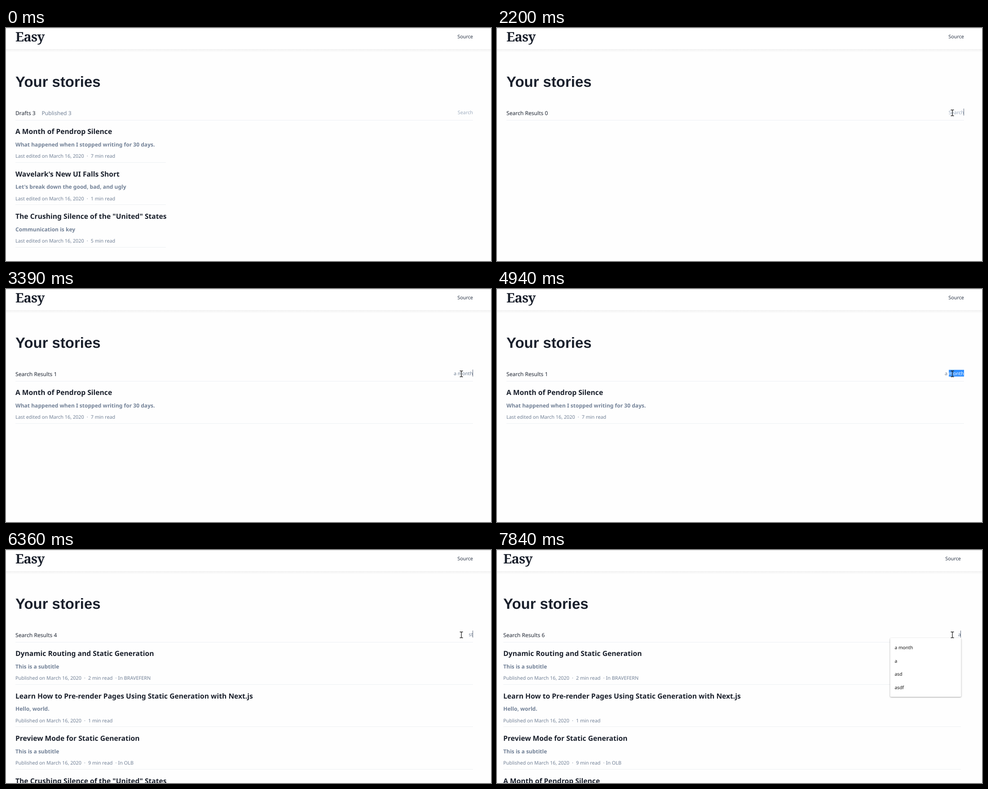
Write an HTML page that moves like this. It is 1080x519 px and loops after 8 s.

```html
<!DOCTYPE html>
<html lang="en">
<head>
<meta charset="utf-8">
<title>Your stories</title>
<style>
  html, body { margin: 0; width: 100%; height: 100%; overflow: hidden; background: #fefefe; }
  svg { display: block; width: 100%; height: 100%; }
  text {
    font-family: "Noto Sans", "Open Sans", sans-serif;
    font-size: 10.85px; fill: #718096;
    white-space: pre; text-rendering: geometricPrecision;
  }
  .logo { font: 700 29.2px "Noto Serif", serif; letter-spacing: -.73px; fill: #1a202c; }
  .head { font: 700 32.9px "Liberation Sans", Arial, sans-serif; fill: #1a202c; }
  .nav { fill: #2d3748; text-anchor: end; }
  .tab { font-size: 12.1px; }
  .on { fill: #1f2633; }
  .title { font-size: 15.65px; font-weight: 700; fill: #1a202c; }
  .sub { font-size: 12.05px; font-weight: 600; }
  .input { font-size: 10.8px; text-anchor: end; }
  .hint { fill: #a0aec0; }
  .option { font-size: 10.3px; font-weight: 500; fill: #111; }
  .menu { fill: #fff; filter: drop-shadow(0 1px 1.5px rgba(0, 0, 0, .38)); }
  .rule { stroke: #edf0f3; }
  .caret { stroke: #5a6678; }
  .picked { fill: #3390ff; }
</style>
</head>
<body>
<svg viewBox="0 0 1080 519" xmlns="http://www.w3.org/2000/svg">
  <defs>
    <linearGradient id="shade" x2="0" y2="1">
      <stop offset="0" stop-color="#f1f1f1"/>
      <stop offset="1" stop-color="#fefefe"/>
    </linearGradient>
  </defs>
  <rect width="1080" height="47" fill="#fff"/>
  <rect y="47" width="1080" height="7" fill="url(#shade)"/>
  <rect width="1080" height="1" fill="#dadada"/>
  <g id="page"></g>
  <path id="arrow" d="M.5 .5V13L3.4 10.3L5.3 14.8L7.4 13.9L5.5 9.5H9.6Z" fill="#fff" stroke="#555" stroke-width=".9"/>
  <path id="beam" d="M-3.5 -6.5H-1L0 -5.5L1 -6.5H3.5M0 -5.5V5.5M-3.5 6.5H-1L0 5.5L1 6.5H3.5" fill="none" stroke="#222" stroke-width="1.3"/>
</svg>
<script>
const LOOP = 8000, RIGHT = 1040, ROW = 94.6;
const byId = id => document.getElementById(id);
const page = byId("page");

const story = (title, sub, mins, where) => ({ title, sub, mins, where });
const month = story("A Month of Pendrop Silence", "What happened when I stopped writing for 30 days.", 7);
const newUi = story("Wavelark's New UI Falls Short", "Let's break down the good, bad, and ugly", 1);
const crushing = story('The Crushing Silence of the "United" States', "Communication is key", 5);
const routing = story("Dynamic Routing and Static Generation", "This is a subtitle", 2, "BRAVEFERN");
const learn = story("Learn How to Pre-render Pages Using Static Generation with Next.js", "Hello, world.", 1);
const preview = story("Preview Mode for Static Generation", "This is a subtitle", 9, "OLB");

const drafts = [month, newUi, crushing];
const published = [routing, learn, preview];
const all = [...published, ...drafts];
const statics = [...published, crushing];
const recent = ["a month", "a", "asd", "asdf"];

// Each step: start time and what changes from the step before.
const steps = [
  [0, { search: false, rows: drafts, query: "", caret: false, menu: [], picked: "" }],
  [2130, { caret: true }],
  [2200, { search: true, rows: [] }],
  [2750, { query: "a", rows: all, menu: recent }],
  [2830, { query: "a ", rows: [month], menu: recent.slice(0, 1) }],
  [2910, { query: "a m" }],
  [3070, { query: "a mo" }],
  [3150, { query: "a mon" }],
  [3310, { query: "a mont" }],
  [3390, { query: "a month", menu: [] }],
  [3930, { caret: false }],
  [4470, { caret: true }],
  [4940, { caret: false, picked: "month" }],
  [5050, { picked: "a month" }],
  [5650, { query: "", picked: "", rows: [], caret: true }],
  [6110, { caret: false }],
  [6200, { query: "s", rows: all, caret: true }],
  [6360, { query: "st", rows: statics }],
  [6440, { query: "sta" }],
  [6980, { caret: false }],
  [7450, { picked: "sta" }],
  [7840, { query: "a", rows: all, picked: "", caret: true, menu: recent }]
];
let last = {};
const states = steps.map(([at, change]) => last = { ...last, ...change, at });

// Pointer moves: first step time and the places, 80 ms apart.
const moves = [
  [310, [[1033, 500], [1017, 452], [993, 400], [972, 352], [961, 317], [959, 297], [966, 285], [974, 281]]],
  [1260, [[977, 272], [982, 256], [991, 232], [1001.5, 206.5], [1009, 193], [1012, 190], [1014, 189], [1014, 189]]]
];

const text = (cls, x, y, s) => `<text class="${cls}" x="${x}" y="${y}">${s}</text>`;
const rule = (x1, x2, y) => `<path class="rule" d="M${x1} ${y}H${x2}"/>`;
const dot = after => `<tspan dx="6">·</tspan><tspan dx="${after}">`;

function row(item, i, left, right) {
  const y = i * ROW;
  const verb = drafts.includes(item) ? "Last edited" : "Published";
  const place = item.where ? `${dot(3.2)}In ${item.where}</tspan>` : "";
  const meta = `${verb} on March 16, 2020${dot(6)}${item.mins} min read</tspan>${place}`;
  return text("title", left, 236 + y, item.title)
    + text("sub", left, 263.5 + y, item.sub)
    + text("meta", left, 289 + y, meta)
    + rule(left, right, Math.floor(299 + y) + .5);
}

function menuBox(items, right) {
  if (!items.length) return "";
  const height = 42 + (items.length - 1) * 29.7;
  return `<rect class="menu" x="${right - 157.5}" y="196" width="158" height="${height}" rx="2"/>`
    + items.map((s, i) => text("option", right - 147.5, 221 + i * 29.7, s)).join("");
}

function input(s, right) {
  if (!s.query) return text("input hint", right, 192, "Search");
  const rest = s.query.slice(0, s.query.length - s.picked.length);
  const mark = s.picked ? `<tspan id="picked" fill="#fff">${s.picked}</tspan>` : "";
  return text("input", right - .3, 192, rest + mark);
}

function draw(s) {
  // A long list brings a scrollbar, which moves the page left.
  const shift = s.rows.length > 4 ? 7 : 0;
  const left = 21 - shift, right = RIGHT - shift;
  const tabs = s.search
    ? text("tab on", left, 194, `Search Results ${s.rows.length}`)
    : text("tab on", left, 194, "Drafts 3") + text("tab", left + 58.5, 194, "Published 3");
  page.innerHTML = text("logo", left, 30, "Easy")
    + text("nav", right, 23, "Source")
    + text("head", left, 131, "Your stories")
    + tabs
    + rule(left, right, 205.5)
    + s.rows.map((item, i) => row(item, i, left, s.search ? right : 356)).join("")
    + input(s, right)
    + (s.caret ? `<path class="caret" d="M${right - .5} 179.5V195"/>` : "")
    + menuBox(s.menu, right);
  const picked = byId("picked");
  if (picked) {
    const width = picked.getComputedTextLength();
    picked.parentNode.insertAdjacentHTML("beforebegin",
      `<rect class="picked" x="${right - width}" y="180" width="${width}" height="15"/>`);
  }
}

function pointer(t) {
  let spot = null;
  for (const [start, path] of moves) {
    if (t >= start) spot = path[Math.min(path.length - 1, Math.floor((t - start) / 80))];
  }
  const typing = spot && spot[1] < 197;
  byId("arrow").style.display = spot && !typing ? "" : "none";
  byId("beam").style.display = typing ? "" : "none";
  if (spot) byId(typing ? "beam" : "arrow").setAttribute("transform", `translate(${spot})`);
}

const begin = performance.now();
let shown;
function tick() {
  const t = (performance.now() - begin) % LOOP;
  const now = states.filter(s => s.at <= t).pop();
  if (now !== shown) draw(shown = now);
  pointer(t);
  requestAnimationFrame(tick);
}
tick();
</script>
</body>
</html>
```
